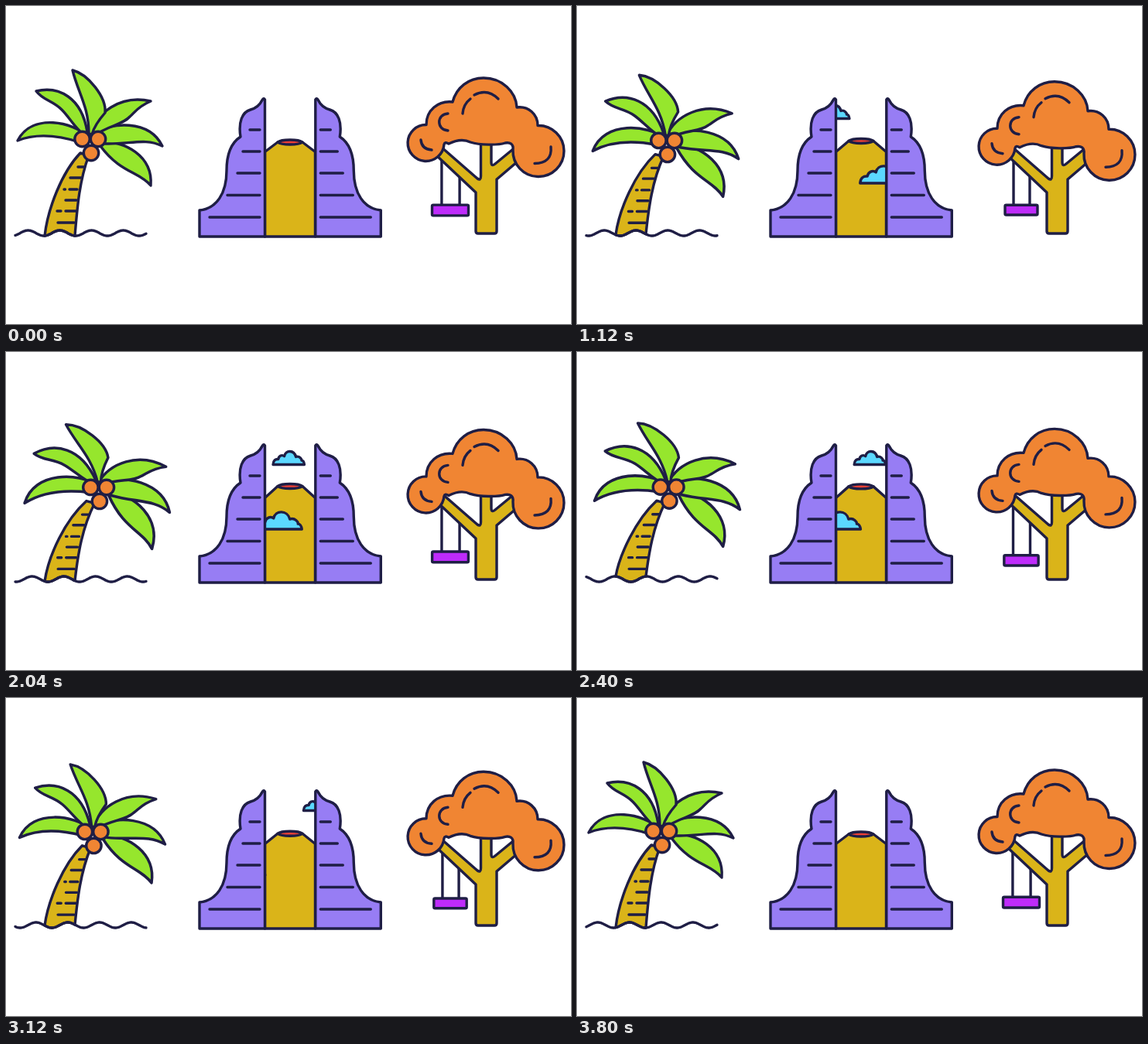
Recreate the animation shown at these times as an HTML page. Size 730 by 411 pixels, loop 3840 ms.

```html
<!DOCTYPE html>
<html>
<head>
<meta charset="utf-8">
<style>
html, body { margin: 0; width: 100%; height: 100%; overflow: hidden; background: #fff }
svg { display: block; stroke: #1f1e45; stroke-width: 3.4; stroke-linecap: round; stroke-linejoin: round; fill: none }
.green { fill: #96e62d } .gold { fill: #dab419 } .orange { fill: #f08533 }
.violet { fill: #977df4 } .cyan { fill: #5bd8ff } .red { fill: #ee4035 } .magenta { fill: #be2bfa }
</style>
</head>
<body>
<svg width="730" height="411" viewBox="0 0 730 411">
  <defs>
    <clipPath id="gap"><rect x="334.5" y="100" width="65" height="198"/></clipPath>
    <path id="cloud" vector-effect="non-scaling-stroke" d="M1.500 0C2-7 6-9.500 11-9C12-15 18-17 22-14C24-25 40-25 43-13C50-15 54-9 53.500-7C56-7 58-4 58.500 0Z"/>
    <g id="tower">
      <path class="violet" d="M334.500 298V121Q333 118 331 121.500C328 128 323 132 316 134C305 137 300 150 303 169C289 178 285 195 285 213C285 242 272 262 250 264V298Z"/>
      <path d="M315 160H328M306 188H328M299 216H328M286 244.500H328M263 273H328"/>
    </g>
  </defs>

  <g id="palm">
    <path id="stem" class="gold"/>
    <path id="marks"/>
    <path id="wave"/>
    <g id="crown">
      <g id="leaves" class="green"></g>
      <g class="orange">
        <circle cx="110" cy="190" r="9.700"/>
        <circle cx="98.500" cy="172" r="9.700"/>
        <circle cx="119" cy="172" r="9.700"/>
      </g>
    </g>
  </g>

  <g id="gate">
    <path id="volcano" class="gold"/>
    <path id="crater" class="red" d="M351 176C356 172 378 172 383 176C378 180 356 180 351 176Z"/>
    <g clip-path="url(#gap)" class="cyan">
      <use id="small" href="#cloud"/>
      <use id="large" href="#cloud"/>
    </g>
    <use href="#tower"/>
    <use href="#tower" transform="translate(734.3) scale(-1 1)"/>
  </g>

  <g id="tree">
    <path id="ropes"/>
    <rect id="seat" class="magenta" rx="1.5"/>
    <path class="gold" d="M607 291V241L555 192L562 182L609 223Q613.500 226 613.500 220V165H627V202Q627 208 632 204L660 181L668 195L634 224V291Q634 294 631 294H610Q607 294 607 291Z"/>
    <g id="foliage">
      <path class="orange" d="M566 179A23.500 23.500 0 1 1 543 153.500C543 135 558 122 577 124C582 105 598 93 617 93C641 93 659 111 660 131C675 129 687 140 687 154.500A33 33 0 1 1 655 186C656 178 651 176 645 177C636 180 612 180 600 176C590 171 580 174 572 178Q567 175 566 179Z"/>
      <path d="M590 139Q591 127 600 120M605 115Q622 106 636 120M571 139C556 140 556 160 571 161M536 173Q537 185 550 186M704 182Q706 203 683 203.500"/>
    </g>
  </g>
</svg>
<script>
const LOOP = 3840, STEP = 40, TAU = Math.PI * 2;
const el = id => document.getElementById(id);
const set = (id, attrs) => {
  for (const name in attrs) el(id).setAttribute(name, attrs[name]);
};

// Each leaf: pivot x, pivot y, droop in degrees, growth while drooping, outline.
const leaves = [
  [115, 180, 13, 0.07, "M115 176C155 172 190 195 187 232C172 214 148 216 122 181Z"],
  [112, 165, 14, 0.06, "M112 165C135 150 185 146 202 181C180 170 160 179 128 178Z"],
  [105, 165, -11, 0.06, "M105 168C88 151 34 137 15 174C40 164 70 168 95 176Z"],
  [105, 162, -15.5, 0.03, "M105 163C98 118 68 103 39 110C48 122 60 122 72 134C82 144 88 156 100 166Z"],
  [110, 163, 16, 0.01, "M109 167C116 138 148 114 187 123C170 130 166 138 160 143C150 154 135 153 113 168Z"],
  [107, 163, -14.7, 0, "M107 165C107 130 93 112 86 83C106 88 130 118 128 138C121 146 114 155 111 166Z"]
].map(([x, y, droop, growth, d]) => {
  const path = document.createElementNS("http://www.w3.org/2000/svg", "path");
  path.setAttribute("d", d);
  el("leaves").append(path);
  return { x, y, droop, growth, path };
});

// Bark lines: y, start x, end x.
const bark = [
  [208, 93, 101], [222, 83, 97], [237, 75, 76.5], [237, 82, 92], [251, 77, 91],
  [265, 66, 71], [265, 77, 90], [280, 67, 88]
];

function waveLine(from, to, shift) {
  const points = [];
  const step = Math.sign(to - from);
  for (let x = from; (to - x) * step >= 0; x += step) {
    points.push(`${x} ${(293.5 - 3.5 * Math.cos(TAU * (x - 28.5 - shift) / 41)).toFixed(2)}`);
  }
  return points.join("L");
}

function drawPalm(sway, phase) {
  const bend = (x, y) => `${x + 11 * sway * ((296 - y) / 124) ** 2} ${y + 3 * sway * (296 - y) / 124} `;
  const shift = 164 * phase;
  const foot = waveLine(89, 50, shift);
  set("stem", { d: `M${foot}C${bend(54, 262)}${bend(72, 215)}${bend(96, 190)}`
    + `L${bend(107, 193)}C${bend(95, 225)}${bend(92, 260)}${foot.split("L")[0]}Z` });
  set("marks", { d: bark.map(([y, a, b]) => `M${bend(a, y)}L${bend(b, y)}`).join("") });
  set("wave", { d: "M" + waveLine(12, 181, shift) });
  set("crown", { transform: `translate(${11 * sway} ${3 * sway})` });
  for (const { x, y, droop, growth, path } of leaves) {
    path.setAttribute("transform",
      `translate(${x} ${y}) rotate(${droop * sway}) scale(${1 + growth * sway}) translate(${-x} ${-y})`);
  }
}

function drawGate(sway, t) {
  const rise = -2.5 * sway;
  set("volcano", { d: `M334.500 298V188.500L351 ${176 + rise}H383L399.500 188.500V298Z` });
  set("crater", { transform: `translate(0 ${rise})` });
  set("small", { transform: `translate(${269.5 + 0.0365 * t} 145.500) scale(.71 .77)` });
  set("large", { transform: `translate(${413.5 - 0.044 * t} 229)` });
}

function drawTree(sway, phase) {
  const c = Math.cos(2 * TAU * phase);
  const y = 264 + 6.5 * (1 - c * c) - 1.1 * (1 - c);
  const x = 574, width = 44.3 + 2.7 * c, height = 13.2 + 0.5 * c, half = 11 + 0.6 * c;
  set("foliage", { transform: `translate(0 ${7.5 * sway})` });
  set("ropes", { d: `M${x + 0.5 - half} 194V${y}M${x + 0.5 + half} 214V${y}` });
  set("seat", { x: x - width / 2, y: y - height / 2, width, height });
}

function frame() {
  const t = Math.floor(performance.now() % LOOP / STEP) * STEP;
  const phase = t / LOOP;
  const sway = (1 - Math.cos(TAU * phase)) / 2;
  drawPalm(sway, phase);
  drawGate(sway, t);
  drawTree(sway, phase);
  requestAnimationFrame(frame);
}
frame();
</script>
</body>
</html>
```
